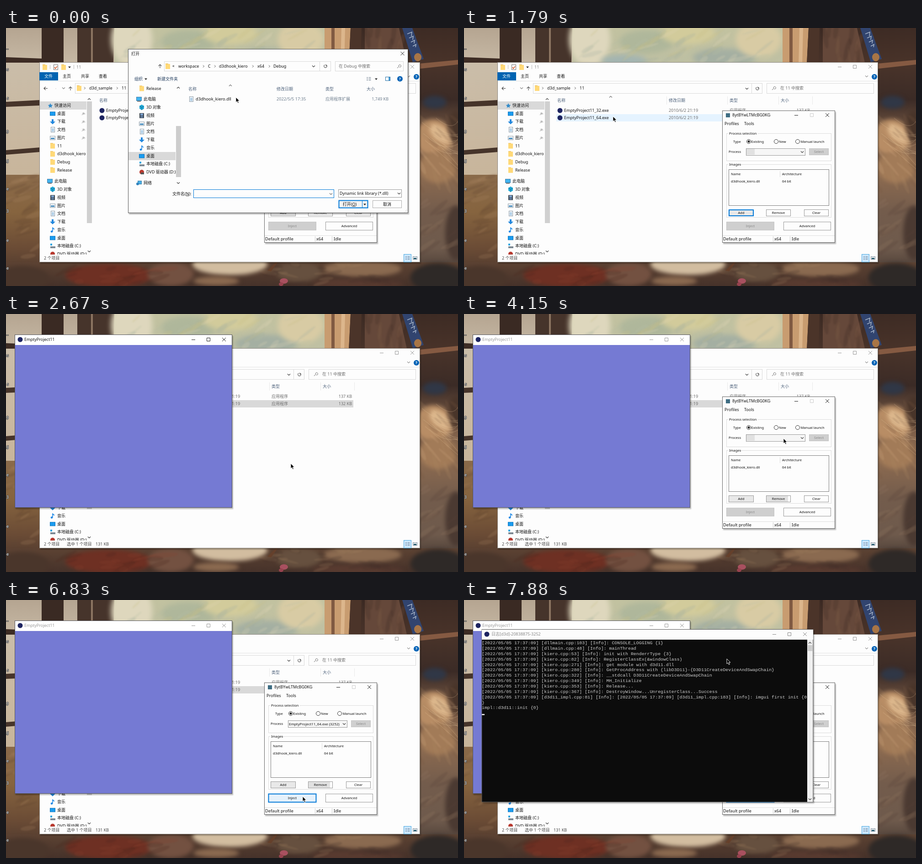
Animation of 989x566 px, one loop 8 s. Source, as an HTML page with a canvas:

```html
<!DOCTYPE html>
<html lang="zh-CN">
<head>
<meta charset="utf-8">
<title>Desktop session</title>
<style>
html, body { margin: 0; width: 100%; height: 100%; overflow: hidden; background: #3a2a22; }
canvas, svg { position: absolute; left: 0; top: 0; width: 989px; height: 566px; display: block; }
text { white-space: pre; font-family: "Noto Sans", "Noto Sans CJK SC", "Noto Sans CJK", sans-serif; }
#log text { font-family: "Liberation Mono", monospace; }
.window { filter: drop-shadow(2px 3px 1px rgba(0,0,0,.26)); }
</style>
</head>
<body>
<canvas id="wall" width="989" height="566"></canvas>
<svg id="stage" viewBox="0 0 989 566"></svg>
<script>
const LOOP = 8000, STEP = 148.33;

// Wallpaper: soft painted shapes
function paintWall() {
  const c = document.getElementById('wall').getContext('2d');
  let seed = 7;
  const rnd = () => (seed = seed * 16807 % 2147483647) / 2147483647;
  const soft = px => { c.filter = px ? `blur(${px}px)` : 'none'; };
  const box = (x, y, w, h, ...colors) => {
    const g = c.createLinearGradient(0, y, 0, y + h);
    colors.forEach((color, i) => g.addColorStop(i / Math.max(1, colors.length - 1), color));
    c.fillStyle = g; c.fillRect(x, y, w, h);
  };
  const blob = (x, y, rx, ry, color, turn = 0) => {
    c.fillStyle = color; c.beginPath(); c.ellipse(x, y, rx, ry, turn, 0, 7); c.fill();
  };
  const poly = (color, ...p) => {
    c.fillStyle = color; c.beginPath();
    for (let i = 0; i < p.length; i += 2) c.lineTo(p[i], p[i + 1]);
    c.fill();
  };
  // loose brush marks leaning one way
  const brush = (n, x, y, w, h, turn, colors) => {
    soft(1.5);
    c.globalAlpha = .22;
    for (let i = 0; i < n; i++) {
      blob(x + rnd() * w, y + rnd() * h, 10 + rnd() * 22, 2 + rnd() * 4, colors[i % colors.length], turn + rnd() * .6);
    }
    c.globalAlpha = 1;
    soft(0);
  };
  box(0, 0, 989, 566, '#46332a');

  // paned window on the left
  box(0, 0, 237, 75, '#b5a591', '#c6b8a4');
  poly('#3a2a23', 78, 0, 126, 0, 126, 76, 78, 76);
  poly('#46342b', 156, 0, 237, 0, 235, 76, 156, 76);
  box(186, 0, 4, 75, '#8c7562');
  box(0, 75, 74, 250, '#cabda9', '#c8b59b');
  poly('#3d2c24', 0, 64, 78, 67, 78, 76, 0, 76);
  poly('#46342a', 0, 162, 74, 158, 74, 170, 0, 173);
  poly('#46342a', 0, 268, 74, 262, 74, 272, 0, 278);

  // painted garden
  box(237, 0, 461, 80, '#c2c2a0', '#bfc0a3');
  soft(6);
  blob(275, 25, 45, 60, '#ded7bd'); blob(400, 30, 60, 26, '#afb79b'); blob(490, 12, 60, 24, '#d2cb9b');
  blob(570, 65, 70, 20, '#a4afa2'); blob(645, 25, 50, 40, '#d8cba4'); blob(350, 72, 50, 14, '#a3b4b0');
  brush(45, 270, 0, 400, 75, -.8, ['#ddd6b4', '#9eaf9f', '#c8bd85', '#b4c0a6']);

  // bookcase
  box(697, 0, 292, 80, '#3d2b24', '#493329');
  poly('#c89c70', 697, 0, 754, 0, 750, 80, 697, 80);
  poly('#805a42', 712, 0, 719, 0, 719, 80, 712, 80);
  poly('#dcb68c', 734, 0, 742, 0, 740, 80, 732, 80);
  poly('#4b3429', 754, 0, 778, 0, 776, 80, 750, 80);
  poly('#65483a', 785, 0, 860, 0, 878, 80, 785, 80);
  brush(14, 785, 0, 80, 75, 1.3, ['#7b5944', '#392821']);

  // right edge
  box(905, 75, 84, 491, '#4a342a', '#3b2b26', '#7b5d48', '#8d6b50', '#735c4c', '#6e5a4c', '#342a27');
  poly('#855a42', 885, 80, 989, 70, 989, 80, 890, 91);
  soft(5);
  blob(938, 163, 26, 14, '#303746'); blob(935, 240, 40, 40, '#b88d65'); blob(950, 232, 28, 15, '#dcb78c', .7);
  blob(945, 305, 40, 35, '#a27b58'); blob(985, 215, 18, 35, '#49352a'); blob(985, 450, 24, 60, '#4b3a32');
  brush(30, 905, 200, 84, 150, .7, ['#d4ae83', '#78583f', '#a98460']);
  brush(16, 905, 360, 84, 140, -.9, ['#917862', '#574337']);
  poly('#31446f', 867, 0, 889, 0, 914, 68, 890, 75);
  blob(901, 64, 8, 9, '#a87546');
  c.lineWidth = 1.6; c.strokeStyle = '#a3b1c6';
  for (let i = 0; i < 4; i++) {
    c.beginPath(); c.moveTo(878 + i * 4, 13 + i * 9); c.lineTo(888 + i * 3, 9 + i * 9); c.lineTo(887 + i * 3, 18 + i * 8); c.stroke();
  }
  c.lineWidth = .7; c.strokeStyle = '#e6c79c77';
  for (let i = 0; i < 12; i++) {
    const x = 906 + rnd() * 35, y = 195 + rnd() * 60;
    c.beginPath(); c.moveTo(x, y); c.quadraticCurveTo(x + 35, y + 30, 989, y + rnd() * 70); c.stroke();
  }

  // left hair and the desk
  box(0, 322, 74, 244, '#8a6a4a', '#86643f', '#6a4b35', '#41302a');
  box(0, 514, 989, 52, '#5d4333', '#46322a');
  soft(5);
  blob(35, 550, 60, 28, '#4a362b'); blob(225, 543, 95, 26, '#6e3023'); blob(360, 540, 50, 26, '#735141');
  blob(490, 518, 82, 24, '#d2bda0'); blob(460, 555, 50, 10, '#8b6a50'); blob(640, 535, 50, 22, '#66503f');
  blob(780, 528, 85, 18, '#8a6a50'); blob(770, 560, 100, 10, '#593b30'); blob(945, 548, 60, 32, '#2e2927');
  brush(24, 0, 325, 74, 180, -.7, ['#a78560', '#5a402e']);
  brush(18, 130, 518, 230, 46, -.5, ['#87412f', '#4b261e']);
  brush(26, 570, 518, 310, 46, -.3, ['#9b7a5c', '#43312a']);
  poly('#65402b', 572, 532, 592, 512, 596, 512, 580, 534);
  blob(608, 555, 9, 6, '#a8505f'); blob(602, 562, 5, 4, '#97424f');
}

// SVG helpers; text is placed by its vertical middle
const rect = (x, y, w, h, fill, more = '') => `<rect x="${x}" y="${y}" width="${w}" height="${h}" fill="${fill}" ${more}/>`;
const frame = (x, y, w, h, color = '#d9d9d9', fill = '#fdfdfd', more = '') =>
  rect(x + .5, y + .5, w - 1, h - 1, fill, `stroke="${color}" ${more}`);
const label = (x, y, s, size = 9, fill = '#111', more = '') =>
  `<text x="${x}" y="${y + size * .36}" font-size="${size}" fill="${fill}" ${more}>${s}</text>`;
const mid = 'text-anchor="middle"', end = 'text-anchor="end"';
const line = (d, color = '#555', w = 1) => `<path d="${d}" fill="none" stroke="${color}" stroke-width="${w}"/>`;
const disc = (x, y, r, fill, more = '') => `<circle cx="${x}" cy="${y}" r="${r}" fill="${fill}" ${more}/>`;
const group = (id, body, more = '') => `<g id="${id}" ${more}>${body}</g>`;
const down = (x, y, c = '#444') => line(`M${x - 3} ${y - 1.5}l3 3l3-3`, c, 1.2);
const up = (x, y, c = '#444') => line(`M${x - 3} ${y + 1.5}l3-3l3 3`, c, 1.2);
const right = (x, y) => line(`M${x - 1} ${y - 2.5}l2.5 2.5l-2.5 2.5`, '#555');
const caret = (x, y) => `<path d="M${x - 3} ${y - 1.5}h6l-3 3.5z" fill="#222"/>`;
const upArrow = (x, y) => line(`M${x} ${y + 4}v-8m-3.5 3.5l3.5-3.5l3.5 3.5`, '#555', 1.1);
const reload = (x, y) => line(`M${x + 2} ${y - 3}a3.3 3.3 0 1 1-4 0m4 0v3m0-3h-3`, '#555', 1.1);
const lens = (x, y) => line(`M${x - 4} ${y + 4}l3.5-3.5a2.6 2.6 0 1 1 1 1`, '#666');
const help = (x, y) => disc(x, y, 6, '#0061b5') + label(x, y, '?', 9, '#fff', mid + ' font-weight="700"');
const rows = (x, y) => [0, 3, 6].map(d => line(`M${x} ${y + d}h3m1.5 0h5`, '#678')).join('');
const controls = (xs, y, c, max = c) =>
  line(`M${xs[0] - 4} ${y + .5}h8`, c) + line(`M${xs[1] - 3.5} ${y - 3.5}h7v7h-7z`, max) +
  line(`M${xs[2] - 4} ${y - 4}l8 8m0-8l-8 8`, c);
const appDot = (x, y) => disc(x, y, 5.5, '#1d2461');

const icons = {
  folder: (x, y) => rect(x - 5, y - 6, 6, 3, '#e9b84b') + rect(x - 5, y - 5, 10, 11, '#ffd978'),
  pc: (x, y) => frame(x - 6, y - 5, 12, 9, '#457fa8', '#41b3ef') + rect(x - 4, y + 4, 8, 1.5, '#666'),
  desk: (x, y) => frame(x - 6, y - 4, 12, 9, '#0b74bd', '#1a9cf0'),
  load: (x, y) => `<path d="M${x - 2} ${y - 5}h4v5h4l-6 6l-6-6h4z" fill="#2187dd"/>`,
  doc: (x, y) => frame(x - 4, y - 6, 9, 12, '#8a9aa8') + line(`M${x - 2} ${y - 2}h5m-5 2.5h5m-5 2.5h5`, '#4a91c9'),
  pic: (x, y) => frame(x - 6, y - 4, 12, 9, '#8c9aa5') + rect(x - 4, y, 8, 3, '#3f87bb'),
  cube: (x, y) => `<path d="M${x} ${y - 6}l5 3v6l-5 3l-5-3v-6z" fill="#22a9d6"/>` + line(`M${x - 5} ${y - 3}l5 3l5-3m-5 3v6`, '#0c6f99'),
  film: (x, y) => rect(x - 5, y - 5, 10, 11, '#39434d') + rect(x - 3, y - 4, 6, 4, '#7ba2d0') + rect(x - 3, y + 1, 6, 4, '#5d7a9e'),
  note: (x, y) => disc(x - 2, y + 4, 2.3, '#1e88e5') + line(`M${x} ${y + 4}v-9q1 3 4 4`, '#1e88e5', 1.6),
  disk: (x, y) => rect(x - 5, y + 1, 11, 4, '#7b8791') + rect(x - 5, y - 5, 4, 4, '#23a3e0'),
  dvd: (x, y) => disc(x, y, 5, '#b93a30') + rect(x - 2, y + 1, 7, 4, '#555'),
  net: (x, y) => frame(x - 3, y - 5, 9, 8, '#3c7da6', '#49b0e6') + disc(x - 3, y + 2, 3, '#3183bd')
};
const navItem = (x, y, kind, s) => icons[kind](x, y) + label(x + 10, y, s);
const drives = [['cube', '3D 对象'], ['film', '视频'], ['pic', '图片'], ['doc', '文档'], ['load', '下载'], ['note', '音乐'],
  ['desk', '桌面'], ['disk', '本地磁盘 (C:)'], ['dvd', 'DVD 驱动器 (D:)']];
const nav = (x, y, items) => items.map(([k, s], i) => navItem(x, y + i * 17.75, k, s)).join('');
const clip = (id, x, y, w, h) => `<clipPath id="${id}">${rect(x, y, w, h, '#000')}</clipPath>`;

function explorer() {
  const head = '#4c607a', gray = '#6d6d6d';
  const quick = [['desk', '桌面'], ['load', '下载'], ['doc', '文档'], ['pic', '图片'], ['folder', '11'],
    ['folder', 'd3dhook_kiero'], ['folder', 'Debug'], ['folder', 'Release']];
  const file = (y, name, size) => appDot(210, y) + label(219, y, name) + label(448, y, '2010/6/2 21:19', 9.2, gray) +
    label(581, y, '应用程序', 9, gray) + label(757, y, size, 9, gray, end);
  const pin = i => line(`M166 ${191 + i * 17.75}l3-3m-2-2l4 4m-2-5l4 4m-4 0l2-3`, '#888');
  return clip('navA', 73, 150, 103, 347) + frame(73, 75, 833, 439, '#8b8680') +
    icons.folder(85, 86) + line('M96.5 81v9', '#bbb') + frame(104, 80, 10, 12, '#777') + line('M106 86l2 3l4-5', '#d35322', 1.4) +
    icons.folder(126, 86) + caret(139, 86) + line('M148.5 81v9', '#bbb') + label(154, 86, '11', 9, '#888') +
    group('exOff', controls([822, 855, 889], 85, '#999')) + group('exOn', controls([822, 855, 889], 85, '#222')) +
    rect(73, 97, 41, 18, '#0063b1') + label(84, 106, '文件', 9, '#fff') +
    label(124, 106, '主页') + label(164, 106, '共享') + label(203, 106, '查看') + line('M74 116.5h831', '#e2e2e2') +
    down(881, 106, '#999') + help(898, 107) +
    line('M91 132.5h-8m3.5-3.5l-3.5 3.5l3.5 3.5', '#444', 1.1) + disc(109, 133, 1, '#ddd') + down(126, 132, '#888') + upArrow(141, 133) +
    frame(151, 121, 502, 23) + icons.folder(160, 132) + right(172, 132) + label(182, 132, 'd3d_sample') + right(243, 132) + label(253, 132, '11') +
    down(619, 133) + line('M629.5 122v21', '#d9d9d9') + reload(642, 133) +
    frame(662, 121, 235, 23) + lens(678, 132) + label(692, 132, '在 11 中搜索', 9, gray) +
    rect(74, 161, 102, 18, '#d9d9d9') + `<path d="M97 165l1.6 3.4l3.6.5l-2.6 2.5l.7 3.7l-3.3-1.8l-3.3 1.8l.7-3.7l-2.6-2.5l3.6-.5z" fill="#318ac9"/>` +
    `<g clip-path="url(#navA)">` + label(106, 170, '快速访问') + nav(102, 187.5, quick) + [0, 1, 2, 3].map(pin).join('') +
    navItem(96, 336, 'pc', '此电脑') + nav(102, 353.8, drives) + '</g>' +
    rect(177, 161, 11, 267, '#d0d0d0') + up(182, 156) + down(182, 490) +
    label(204, 159, '名称', 9, head) + up(321, 151, '#777') + label(448, 159, '修改日期', 9, head) + label(581, 159, '类型', 9, head) +
    label(693, 159, '大小', 9, head) + line('M443.5 150v18m133-18v18m112-18v18m74-18v18', '#e9e9e9') +
    rect(202, 189, 558, 16, 'none', 'id="row"') + file(181, 'EmptyProject11_32.exe', '137 KB') + file(197, 'EmptyProject11_64.exe', '132 KB') +
    label(83, 505, '2 个项目', 9, '#444') + group('picked', label(133, 505, '选中 1 个项目', 9, '#444') + label(196, 505, '131 KB', 9, '#444')) +
    frame(870, 496, 17, 18, '#4aa7de', '#cce8ff') + rows(874, 501.5) +
    frame(890, 501, 10, 7, '#789') + rect(892, 504, 6, 3, '#367');
}

function injector() {
  const s = 7.5;
  const radio = (x, tx, name) => disc(x, 249, 4.5, '#fff', 'stroke="#333"') + label(tx, 249, name, s);
  const button = (x, y, w, h, name, fill = '#fdfdfd', color = '#111') =>
    frame(x, y, w, h, color === '#111' ? '#999' : '#c4c4c4', fill) + label(x + w / 2, y + h / 2, name, s, color, mid);
  const box = (y, h, name) => frame(574, y, 230, h, '#dcdcdc', 'none') + rect(578, y - 3, name.length * 3.8, 7, '#fdfdfd') + label(580, y, name, s);
  return frame(565, 181, 247, 290, '#666') + rect(573, 187, 9, 9, '#3f6d83') + label(587, 191, '8ytBYwLTMcBG0KG', 9.1) +
    controls([727, 761, 795], 191, '#222', '#ccc') + label(570, 210, 'Profiles', 9) + label(613, 210, 'Tools', 9) +
    box(231, 61, 'Process selection') + label(589, 249, 'Type', s) + radio(623, 628.5, 'Existing') + radio(683, 689, 'New') + radio(730, 736.5, 'Manual launch') +
    disc(623, 249, 2.5, '#222') + label(579, 271.5, 'Process', s) +
    frame(617, 264, 130, 16, '#999', '#f6f6f6', 'id="combo"') + rect(618, 265, 18, 13, '#e1e1e1', 'id="stub"') + down(740, 272) +
    group('choice', label(619, 272, 'EmptyProject11_64.exe (3252)', 7.9)) + button(755, 264, 43, 15, 'Select', '#cfcfcf', '#888') +
    box(299, 117, 'Images') + frame(579, 310, 220, 80, '#7d7d7d') + label(584, 320.5, 'Name', s) + label(696, 320.5, 'Architecture', s) + line('M691.5 314v13', '#ddd') +
    group('image', label(584, 336, 'd3dhook_kiero.dll', 7.6) + label(696, 336, '64 bit', s)) +
    button(579, 398, 55, 15, 'Add', '#e8e8e8') + rect(580, 399, 53, 13, 'none', 'id="focus" stroke="#0078d7" stroke-width="2"') +
    rect(662, 399, 47, 13, '#e1e1e1', 'id="shade"') + button(661, 398, 54, 15, 'Remove', 'none') + button(744, 398, 54, 15, 'Clear') +
    button(574, 425, 105, 19, 'Inject', '#cfcfcf', '#888') + group('ready', button(574, 425, 105, 19, 'Inject', '#e5e5e5')) +
    group('hot', frame(574, 425, 105, 19, '#0078d7', '#e5f1fb', 'stroke-width="2"') + label(626.5, 434.5, 'Inject', s, '#111', mid)) +
    button(699, 425, 104, 19, 'Advanced') + line('M566 455.5h245', '#ddd') + line('M676.5 457v12m37-12v12', '#ccc') +
    label(567, 463, 'Default profile', 9.2) + label(679, 463, 'x64', 9) + group('idle', label(717, 463, 'Idle', 9)) + group('busy', label(717, 463, 'Injecting...', 9));
}

function dialog() {
  const head = '#4c607a', gray = '#6d7d8d';
  return clip('navB', 268, 124, 103, 226) + frame(267, 46, 613, 360, '#555') + label(274, 57, '打开') + line('M863.5 52l8 8m0-8l-8 8', '#222') +
    upArrow(337, 84) + frame(346, 73, 365, 22) + icons.folder(354, 84) + label(364, 83, '«') +
    [[377, 'workspace'], [442, 'C'], [466, 'd3dhook_kiero'], [550, 'x64'], [585, 'Debug']].map(([x, s]) => label(x, 83.5, s)).join('') +
    [432, 457, 540, 576].map(x => right(x, 84)).join('') + down(673, 84) + line('M686.5 74v20', '#d9d9d9') + reload(699, 84) +
    frame(720, 73, 150, 22) + label(728, 84, '在 Debug 中搜索', 9, '#6d6d6d') + lens(860, 84) +
    label(281, 112, '组织', 9, '#1e395b') + caret(306, 112) + label(331, 112, '新建文件夹', 9, '#1e395b') +
    rows(789, 108.5) + caret(810, 112) + frame(830, 107, 11, 9, '#2d75aa') + rect(837, 108, 3, 7, '#4ba0d8') + help(862, 111.5) +
    rect(268, 272, 103, 18, '#d9d9d9') + `<g clip-path="url(#navB)">` + navItem(297, 132.5, 'folder', 'Release') + navItem(291, 156, 'pc', '此电脑') +
    nav(297, 174, drives) + navItem(291, 340, 'net', '网络') + '</g>' + rect(372, 215, 11, 112, '#cdcdcd') + up(377, 131) + down(377, 340) +
    label(399, 134, '名称', 9, head) + up(491, 126, '#777') + label(592, 134, '修改日期', 9, head) + label(699, 134, '类型', 9, head) + label(789, 134, '大小', 9, head) +
    rect(397, 148, 446, 17, '#cce8ff', 'id="dllRow"') + icons.doc(405, 156) + label(415, 156, 'd3dhook_kiero.dll', 9.3) + label(592, 156, '2022/5/5 17:35', 9.2, gray) +
    label(699, 156, '应用程序扩展', 9, gray) + label(837, 156, '1,749 KB', 9, gray, end) +
    label(364, 363.5, '文件名(<tspan text-decoration="underline">N</tspan>):') + frame(410, 354, 308, 19, '#0078d7') + down(711, 364, '#777') +
    group('dllName', label(414, 363.5, 'd3dhook_kiero.dll')) + frame(727, 354, 139, 18, '#999') + label(730, 363, 'Dynamic link library (*.dll)', 8.8) + down(860, 363) +
    frame(728, 378, 64, 17, '#0078d7', '#f4f4f4', 'stroke-width="2"') + label(752, 386.5, '打开(<tspan text-decoration="underline">O</tspan>)', 9, '#111', mid) +
    line('M779.5 379v15', '#0078d7') + caret(785, 387) + frame(802, 378, 64, 17, '#adadad') + label(834, 386.5, '取消', 9, '#111', mid) +
    [0, 1, 2].map(i => rect(876 - i * 2, 399 + i * 2, 1, 1, '#aaa')).join('');
}

const game = () => frame(19, 45, 476, 380, '#55555c', '#757ad3') + rect(20, 46, 474, 22, '#fff') + appDot(31, 56) +
  group('gameOn', label(40, 56, 'EmptyProject11') + controls([410, 443, 477], 56, '#222')) +
  group('gameOff', label(40, 56, 'EmptyProject11', 9, '#999') + controls([410, 443, 477], 56, '#999'));

const processes = `ChsIME.exe (2276)|ChsIME.exe (6092)|coherence.exe (2952)|coherence.exe (3400)|Cortana.exe (7000)|csrss.exe (492)|csrss.exe (580)|ctfmon.exe (5736)|devenv.exe (1704)|dllhost.exe (3068)|dllhost.exe (3564)|dllhost.exe (7656)|dwm.exe (796)|EmptyProject11_64.exe (3252)|explorer.exe (4668)|FNPLicensingService.exe (2880)|fontdrvhost.exe (872)|fontdrvhost.exe (880)|HipsDaemon.exe (1740)|HipsTray.exe (6780)|lsass.exe (740)|Microsoft.Photos.exe (6504)|Microsoft.ServiceHub.Controller.|MoUsoCoreWorker.exe (504)|msdtc.exe (4140)|mspdbsrv.exe (6360)|PerfWatson2.exe (4512)|prl_cc.exe (5752)|prl_tools.exe (3080)|prl_tools_service.exe (3000)`.split('|');
const PITCH = 9.64;
const menu = () => frame(616, 279.5, 131, 290, '#2a82c9') + rect(617.5, 0, 116.5, 9.7, '#0078d7', 'id="mark"') +
  processes.map((s, i) => label(618, 285.7 + i * PITCH, s, 7.8, '#111', 'class="proc"')).join('') +
  rect(734.5, 281, 11.5, 285, '#f0f0f0') + rect(735, 293, 10.5, 77, '#cdcdcd') + up(740, 287) + down(740, 563.5);

const stamp = '[2022/05/05 17:37:09] ';
const logLines = ['[dllmain.cpp:103] [Info]: CONSOLE_LOGGING {1}', '[dllmain.cpp:48] [Info]: mainThread',
  '[kiero.cpp:53] [Info]: init with RenderrType {3}', '[kiero.cpp:82] [Info]: RegisterClassEx(&amp;windowClass)',
  '[kiero.cpp:271] [Info]: get module with d3d11.dll', '[kiero.cpp:280] [Info]: GetProcAddress with {libD3D11}-{D3D11CreateDeviceAndSwapChain}',
  '[kiero.cpp:322] [Info]: __stdcall D3D11CreateDeviceAndSwapChain', '[kiero.cpp:349] [Info]: MH_Initialize', '[kiero.cpp:353] [Info]: Release...',
  '[kiero.cpp:367] [Info]: DestroyWindow...UnregisterClass...Success',
  `[d3d11_impl.cpp:81] [Info]: ${stamp}[d3d11_impl.cpp:183] [Info]: imgui first init {0`].map(s => stamp + s).concat('}', 'impl::d3d11::init {0}');
const terminal = () => frame(38.5, 64, 726, 379.5, '#555', '#0c0c0c') + rect(39, 65, 725, 22, '#fcfcfc') + appDot(50, 75) +
  label(60, 75, '日志[d3d]-20838875-3252', 9, '#888') + controls([679, 712, 746], 75, '#888') +
  rect(751, 87, 12.5, 356, '#f0f0f0') + rect(752, 99, 10.5, 13, '#cdcdcd') + up(757, 94) + down(757, 437) +
  group('log', logLines.map((s, i) => label(39, 93.5 + i * 11.87, s, 9.88, '#cfcfcf')).join('')) + rect(39, 0, 6, 2.5, '#f2f2f2', 'id="prompt"');

paintWall();
const desktopText = [['...', 44], ['ps', 91], ['s', 154], ['19', 228], ['g', 291], ['e', 353], ['3', 402], ['e', 466], ['e', 527]];
document.getElementById('stage').innerHTML =
  desktopText.map(([s, y]) => label(6, y, s, 9, '#fff', end + ' stroke="#333" stroke-width="1.4" paint-order="stroke"')).join('') +
  group('explorer', explorer(), 'class="window"') + group('game', game(), 'class="window"') + group('injector', injector(), 'class="window"') +
  group('dialog', dialog(), 'class="window"') + group('menu', menu()) + group('console', terminal(), 'class="window"') +
  group('cursor', '<path d="M0 0v11l2.6-2.3l1.9 4.2l1.9-.9l-1.9-4h3.5z" fill="#000" stroke="#fff" stroke-width=".9"/>');

const el = id => document.getElementById(id);
const show = (id, on) => { el(id).style.display = on ? '' : 'none'; };
const pose = (id, opacity, scale, cx, cy) => {
  show(id, opacity > 0);
  el(id).style.opacity = opacity;
  el(id).setAttribute('transform', `translate(${cx} ${cy}) scale(${scale}) translate(${-cx} ${-cy})`);
};
const within = (k, a, b) => k >= a && k < b;

// step, x, y
const path = [[0, 503, 152], [2, 503, 152], [4, 430, 178], [7, 340, 202], [8, 340, 202], [10, 326, 194], [16, 326, 194], [18, 623, 328],
  [21, 640, 505], [24, 640, 505], [26, 660, 580], [28, 699, 273], [30, 720, 267], [32, 720, 272], [39, 688, 406],
  [41, 688, 406], [45, 649, 431], [49, 649, 431], [53, 575, 129]];
function cursorAt(k) {
  const n = Math.max(1, path.findIndex(p => p[0] >= k));
  const [a, x0, y0] = path[n - 1], [b, x1, y1] = path[n], u = (k - a) / (b - a);
  return [x0 + (x1 - x0) * u, y0 + (y1 - y0) * u];
}

function render(k) {
  const [x, y] = cursorAt(k);
  el('cursor').setAttribute('transform', `translate(${x} ${y})`);

  pose('dialog', k < 2 ? 1 : k < 3 ? .4 : 0, k < 2 ? 1 : .97, 573, 226);
  show('dllRow', k === 1); show('dllName', k >= 1);

  const active = within(k, 13, 17);
  show('exOn', active); show('exOff', !active);
  show('picked', k >= 13);
  el('row').setAttribute('fill', k < 6 ? 'none' : k < 13 ? '#e5f3ff' : active ? '#cce8ff' : '#d9d9d9');

  pose('game', k < 17 ? 0 : k === 17 ? .6 : 1, k === 17 ? .97 : 1, 257, 235);
  show('gameOn', k < 27); show('gameOff', k >= 27);

  show('injector', k < 13 || k >= 27);
  show('image', k >= 3); show('focus', within(k, 2, 13)); show('shade', k >= 27);
  const open = within(k, 31, 41);
  const lit = open || k === 30;
  el('combo').setAttribute('fill', lit ? '#cce4f7' : '#f6f6f6');
  el('combo').setAttribute('stroke', lit ? '#0078d7' : '#999');
  show('stub', k < 30); show('choice', k >= 41); show('menu', open);
  show('ready', within(k, 41, 44)); show('hot', within(k, 44, 48) || k >= 51);
  show('busy', within(k, 48, 51)); show('idle', !within(k, 48, 51));

  const row = open && y > 280 ? Math.floor((y - 281) / PITCH + .05) : -1;
  el('mark').setAttribute('y', 281 + row * PITCH);
  show('mark', row >= 0);
  document.querySelectorAll('.proc').forEach((p, i) => p.setAttribute('fill', i === row ? '#fff' : '#111'));

  pose('console', k < 49 ? 0 : k === 49 ? .5 : 1, k === 49 ? .975 : 1, 401, 253.5);
  show('log', k >= 51);
  el('prompt').setAttribute('y', k >= 51 ? 250 : 96);
}

const start = performance.now();
let last = -1;
function tick() {
  const k = Math.floor(((performance.now() - start) % LOOP + 6) / STEP);
  if (k !== last) render(last = k);
  requestAnimationFrame(tick);
}
tick();
</script>
</body>
</html>
```
